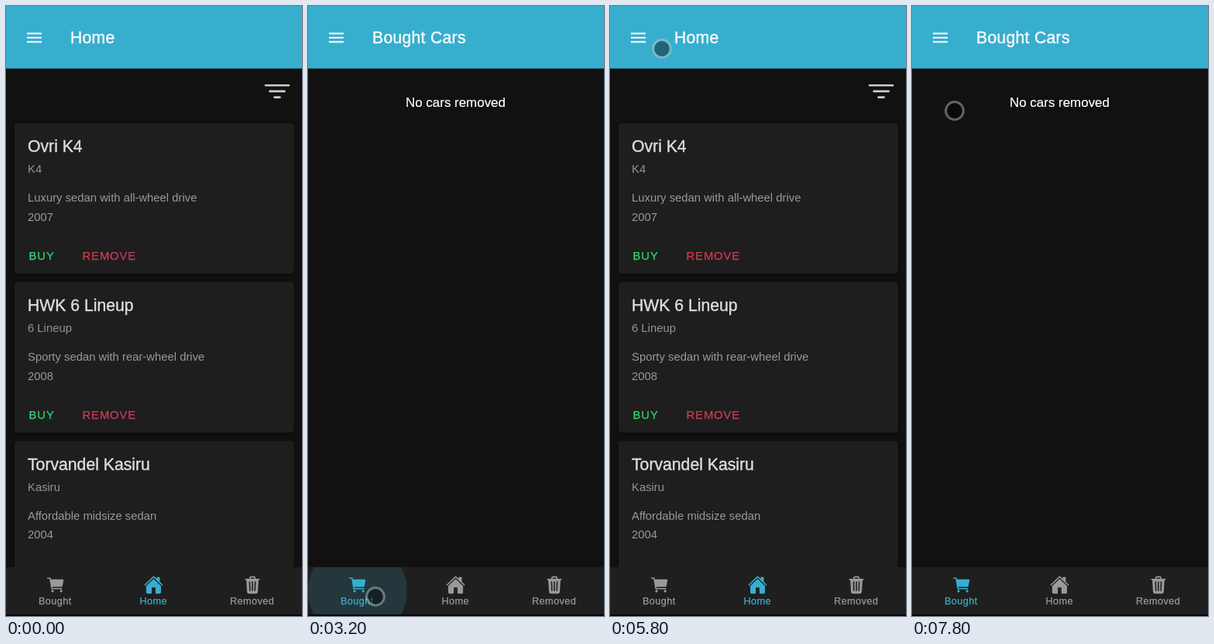
Animation of 382x786 px, one loop 8 s. Source, as an HTML page with a canvas:

```html
<!DOCTYPE html>
<html lang="en">
<head>
<meta charset="utf-8">
<title>Car list app</title>
<style>
html, body { margin: 0; width: 100%; height: 100%; overflow: hidden; background: #111; }
canvas { display: block; }
</style>
</head>
<body>
<canvas id="stage" width="382" height="786"></canvas>
<script>
const ctx = document.getElementById('stage').getContext('2d');
const W = 382, H = 786, LOOP = 8000, STEP = 200;
const BLUE = '#38aecf', PAGE = '#111111', PANEL = '#1e1e1e', GRAY = '#999999';
const FONT = '"Liberation Sans", Arial, sans-serif';

const icons = {
  cart: new Path2D('M457 121a24 24 0 0 0-19-9H134l-6-35A16 16 0 0 0 112 64H48a16 16 0 0 0 0 32h51l45 259a16 16 0 0 0 16 13h256a16 16 0 0 0 0-32H173l-5-32h241a24 24 0 0 0 24-19l29-144a24 24 0 0 0-5-20zM208 416a32 32 0 1 1-64 0a32 32 0 1 1 64 0zM432 416a32 32 0 1 1-64 0a32 32 0 1 1 64 0z'),
  home: new Path2D('M256 98L64 280V448a32 32 0 0 0 32 32h96a16 16 0 0 0 16-16V320h96v144a16 16 0 0 0 16 16h96a32 32 0 0 0 32-32V280zM491 244l-75-71V64a16 16 0 0 0-16-16h-48a16 16 0 0 0-16 16v32l-58-55a32 32 0 0 0-44 0L21 244a16 16 0 0 0 22 24L256 64L469 268a16 16 0 0 0 22-24z'),
  trash: new Path2D('M432 96h-96V72a40 40 0 0 0-40-40h-80a40 40 0 0 0-40 40v24H80a16 16 0 0 0 0 32h17l19 305c1 27 22 47 48 47h184c26 0 46-20 48-47l19-305h17a16 16 0 0 0 0-32zM192 416a16 16 0 0 1-16-15l-8-224a16 16 0 1 1 32-2l8 224a16 16 0 0 1-16 17zM272 400a16 16 0 0 1-32 0V176a16 16 0 0 1 32 0zM304 96h-96V72a8 8 0 0 1 8-8h80a8 8 0 0 1 8 8zM320 416a16 16 0 0 1-16-17l8-224a16 16 0 1 1 32 2l-8 224a16 16 0 0 1-16 15z')
};

const tabs = [
  { name: 'Bought', icon: 'cart', x: 64, label: 42 },
  { name: 'Home', icon: 'home', x: 190.5, label: 172.5 },
  { name: 'Removed', icon: 'trash', x: 318, label: 289 }
];

const cars = [
  ['Ovri K4', 'K4', 'Luxury sedan with all-wheel drive', '2007'],
  ['HWK 6 Lineup', '6 Lineup', 'Sporty sedan with rear-wheel drive', '2008'],
  ['Torvandel Kasiru', 'Kasiru', 'Affordable midsize sedan', '2004']
];

// start time and tab index of each page
const visits = [[0, 1], [2800, 0], [4000, 2], [5000, 1], [7400, 0]];

// tap time and tab index
const taps = [[2700, 0], [3900, 2], [4900, 1]];

// pointer way: time, x, y
const way = [
  [1600, 300, 650], [2000, 240, 700], [2400, 83, 757], [3200, 87, 761],
  [3400, 150, 758], [3800, 325, 760], [4200, 328, 760], [4600, 203, 758],
  [5000, 201, 758], [5200, 198, 745], [5600, 95, 150], [5800, 67, 55],
  [6200, 64, 55], [6600, 47, 89], [7000, 52, 190], [7400, 52, 195], [7800, 55, 135]
];

const clamp = v => Math.max(0, Math.min(1, v));
const ease = v => 1 - Math.pow(1 - clamp(v), 3);

function rect(x, y, w, h, color) {
  ctx.fillStyle = color;
  ctx.fillRect(x, y, w, h);
}

// bold is the width of an outline that thickens the letters
function text(s, x, y, size, color, spacing = 0, bold = 0) {
  ctx.font = size + 'px ' + FONT;
  ctx.letterSpacing = spacing + 'px';
  ctx.fillStyle = color;
  ctx.fillText(s, x, y);
  if (!bold) return;
  ctx.strokeStyle = color;
  ctx.lineWidth = bold;
  ctx.lineJoin = 'round';
  ctx.strokeText(s, x, y);
}

function icon(name, x, y, color) {
  ctx.save();
  ctx.translate(x, y);
  ctx.scale(0.0497, 0.0497);
  ctx.translate(-256, -256);
  ctx.fillStyle = color;
  ctx.fill(icons[name]);
  ctx.restore();
}

function header(title) {
  ctx.save();
  ctx.shadowColor = 'rgba(0,0,0,.5)';
  ctx.shadowBlur = 5;
  ctx.shadowOffsetY = 1;
  rect(0, 0, W, 80, BLUE);
  ctx.restore();
  rect(0, 80, W, 1, '#246a7d');
  for (let i = 0; i < 3; i++) rect(27, 34.4 + i * 5.4, 19, 2.1, '#f4fafc');
  text(title, 83, 48, 21.2, '#f8fcfd', 0.27, 0.4);
}

function card(car, y) {
  ctx.save();
  ctx.shadowColor = 'rgba(0,0,0,.5)';
  ctx.shadowBlur = 5;
  ctx.shadowOffsetY = 2;
  ctx.fillStyle = PANEL;
  ctx.beginPath();
  ctx.roundRect(11, y, 360.5, 194, 4);
  ctx.fill();
  ctx.restore();
  text(car[0], 28, y + 37.2, 21.2, '#dedede', 0, 0.4);
  text(car[1], 28, y + 64.2, 14.84, '#949494');
  text(car[2], 28, y + 101.2, 14.84, '#999999');
  text(car[3], 28, y + 126, 14.84, '#999999');
  text('BUY', 29.5, y + 176, 14.84, '#2fd873', 0.89, 0.25);
  text('REMOVE', 98.5, y + 176, 14.84, '#d03b56', 0.89, 0.25);
}

function homePage() {
  cars.forEach((car, i) => card(car, 151 + i * 204.7));
  ctx.strokeStyle = '#d0cad2';
  ctx.lineWidth = 2.6;
  ctx.lineCap = 'round';
  ctx.beginPath();
  [15, 9.5, 3.5].forEach((half, i) => {
    const y = 102.2 + i * 7.7;
    ctx.moveTo(350 - half, y);
    ctx.lineTo(350 + half, y);
  });
  ctx.stroke();
}

function ripple(t) {
  for (const [start, i] of taps) {
    const age = t - start;
    if (age < 0 || age > 550) continue;
    ctx.save();
    ctx.beginPath();
    ctx.rect(i * 127.3, 723, 127.3, 61);
    ctx.clip();
    ctx.fillStyle = 'rgba(56,174,207,.17)';
    ctx.beginPath();
    ctx.arc(tabs[i].x, 754, 64 * ease(0.3 + age / 400), 0, 7);
    ctx.fill();
    ctx.restore();
  }
}

function tabBar(active, t) {
  rect(0, 723, W, 61, '#1f1f1f');
  ripple(t);
  tabs.forEach((tab, i) => {
    const color = i === active ? BLUE : GRAY;
    icon(tab.icon, tab.x, 746, color);
    text(tab.name, tab.label, 771, 12.72, color, 0.38, 0.25);
  });
  rect(0, 784, W, 2, '#050505');
}

function menu(open) {
  if (open <= 0) return;
  rect(0, 81, W, 703, 'rgba(30,80,95,' + 0.25 * open + ')');
  ctx.save();
  ctx.translate(-307 * (1 - open), 0);
  ctx.beginPath();
  ctx.roundRect(0, 0, 307, 784, [0, 17, 17, 0]);
  ctx.clip();
  rect(0, 0, 307, 784, PAGE);
  rect(0, 0, 307, 330, PANEL);
  rect(0, 59.5, 307, 1, '#181818');
  text('Menu', 6, 37, 21.2, '#ffffff', 0.27, 0.4);
  [1, 0, 2].forEach((n, i) => {
    const y = 110.3 + i * 84.6;
    icon(tabs[n].icon, 31.5, y, GRAY);
    text(tabs[n].name, 95, y + 5.6, 16.96, '#ffffff', 0, 0.25);
  });
  ctx.restore();
}

function pointer(t) {
  if (t < way[0][0]) return;
  let i = 0;
  while (i < way.length - 2 && t >= way[i + 1][0]) i++;
  const [t0, x0, y0] = way[i], [t1, x1, y1] = way[i + 1];
  const p = clamp((t - t0) / (t1 - t0));
  const x = x0 + (x1 - x0) * p, y = y0 + (y1 - y0) * p;
  ctx.fillStyle = 'rgba(0,0,0,.42)';
  ctx.beginPath();
  ctx.arc(x, y, 10, 0, 7);
  ctx.fill();
  ctx.strokeStyle = 'rgba(200,200,200,.45)';
  ctx.lineWidth = 3;
  ctx.beginPath();
  ctx.arc(x, y, 11.4, 0, 7);
  ctx.stroke();
}

function draw(t) {
  const page = visits.filter(v => v[0] <= t).pop()[1];
  rect(0, 0, W, H, PAGE);
  if (page === 1) homePage();
  else text('No cars removed', 126, 129.6, 16.96, '#ffffff', 0, 0.2);
  header(page === 1 ? 'Home' : tabs[page].name + ' Cars');
  tabBar(page, t);
  menu(ease((t - 6000) / 500) - ease((t - 7250) / 350));
  pointer(t);
}

// the screen refreshes five times a second
function loop() {
  const t = performance.now() % LOOP;
  draw(Math.floor(t / STEP) * STEP);
  requestAnimationFrame(loop);
}
loop();
</script>
</body>
</html>
```
